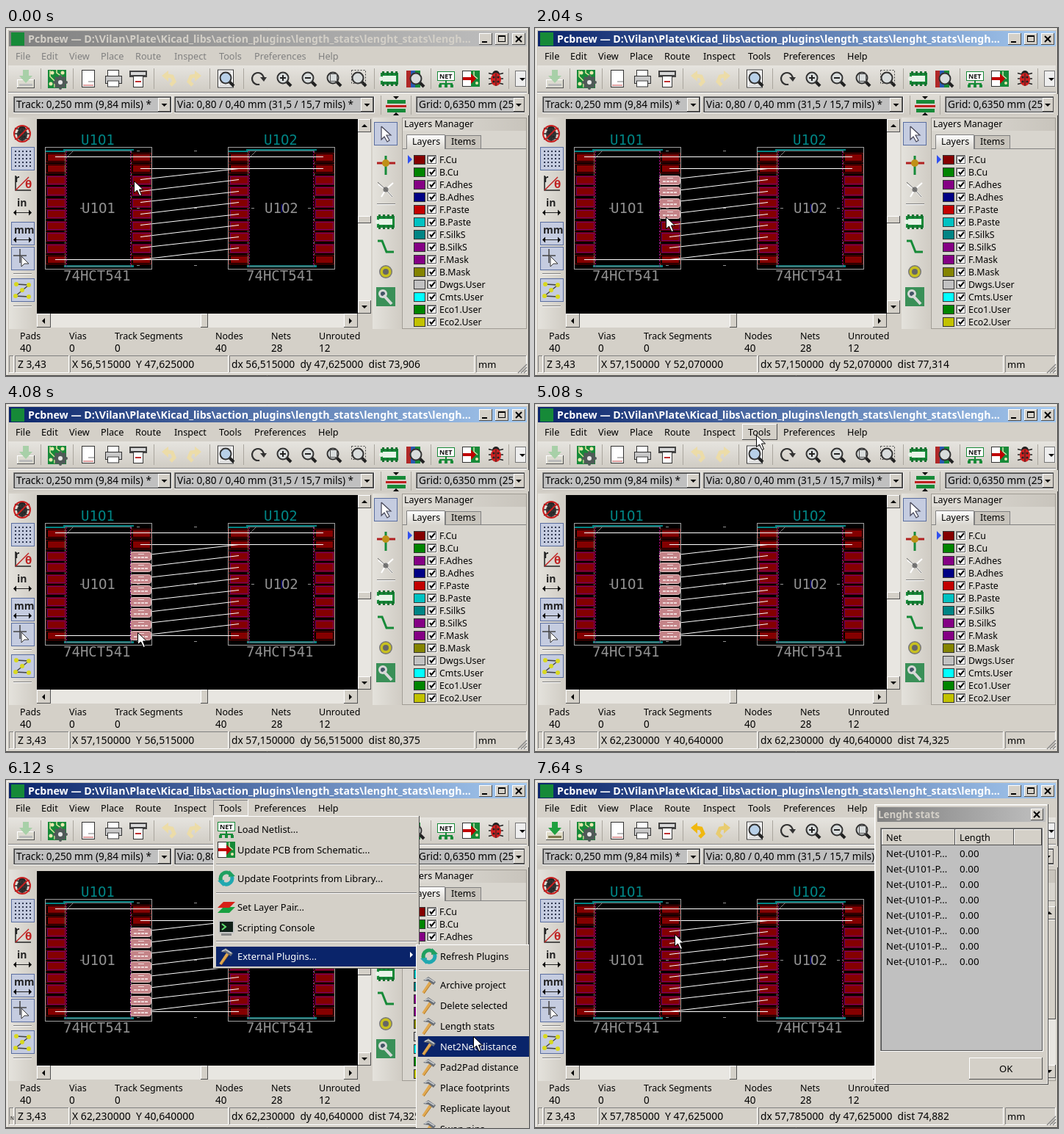
These frames come from a looping animation (712 px wide and 474 px high, 8 s). An HTML page with a canvas:

```html
<!DOCTYPE html>
<html lang="en">
<head>
<meta charset="utf-8">
<title>Board editor</title>
<style>
html, body { margin: 0; width: 100%; height: 100%; overflow: hidden; background: #d4d0c8 }
canvas { display: block }
</style>
</head>
<body>
<canvas id="stage" width="712" height="474"></canvas>
<script>
const g = document.getElementById('stage').getContext('2d');
const FACE = '#d4d0c8', NAVY = '#0a246a', GREY = '#808080', GREEN = '#168a38';

// start, pointer x, pointer y, board X, board Y, selected pads
const STEPS = [
  [0, 174, 208, 56.515, 47.625, 0],
  [480, 174, 208, 56.515, 47.625, 1],
  [1000, 174, 220, 56.515, 48.895, 2],
  [1520, 177, 247, 57.15, 50.8, 3],
  [2040, 178, 257, 57.15, 52.07, 4],
  [2560, 178, 269, 57.15, 52.705, 5],
  [3080, 179, 299, 57.15, 55.245, 6],
  [3560, 179, 311, 57.15, 56.515, 7],
  [4080, 179, 311, 57.15, 56.515, 8],
  [4600, 256, 112, 62.23, 40.64, 8],
  [5080, 301, 42, 62.23, 40.64, 8],
  [5600, 600, 237, 62.23, 40.64, 8],
  [6120, 636, 349, 62.23, 40.64, 8],
  [6640, 568, 48, 62.23, 40.64, 0],
  [7120, 400, 6, 62.23, 40.64, 0],
  [7640, 190, 210, 57.785, 47.625, 0]
];

// ---- drawing helpers ----
function rect(x, y, w, h, c) { g.fillStyle = c; g.fillRect(x, y, w, h); }
function box(x, y, w, h, c) { g.strokeStyle = c; g.lineWidth = 1; g.strokeRect(x + .5, y + .5, w - 1, h - 1); }
function path(pts) {
  g.beginPath();
  for (let i = 0; i < pts.length; i += 2) g.lineTo(pts[i], pts[i + 1]);
}
function line(c, w, ...pts) { path(pts); g.strokeStyle = c; g.lineWidth = w; g.stroke(); }
function poly(c, ...pts) { path(pts); g.fillStyle = c; g.fill(); }
function disc(x, y, r, c) { g.beginPath(); g.arc(x, y, r, 0, 7); g.fillStyle = c; g.fill(); }
function arc(x, y, r, a, b, c, w) {
  g.beginPath(); g.arc(x, y, r, a, b); g.strokeStyle = c; g.lineWidth = w; g.stroke();
}
function text(s, x, y, size = 12.7, c = '#000', weight = 400, font = '"Noto Sans", sans-serif') {
  g.font = `${weight} ${size}px ${font}`; g.fillStyle = c; g.fillText(s, x, y);
}
function stroked(s, x, y, c) {
  text(s.replace(/0/g, 'O'), x, y, 19, c, 400, '"DejaVu Sans Mono", monospace');
}
function fade(x, y, w, h, a, b, down) {
  const f = g.createLinearGradient(x, y, down ? x : x + w, down ? y + h : y);
  f.addColorStop(0, a); f.addColorStop(1, b);
  rect(x, y, w, h, f);
}
function bevel(x, y, w, h, up = true, bg = FACE) {
  rect(x, y, w, h, up ? '#505050' : '#fff');
  rect(x, y, w - 1, h - 1, up ? '#fff' : GREY);
  rect(x + 1, y + 1, w - 2, h - 2, bg);
}
function hollow(x, y, w, h) {
  line(GREY, 1, x + .5, y + h, x + .5, y + .5, x + w, y + .5);
  line('#fff', 1, x + w - .5, y, x + w - .5, y + h - .5, x, y + h - .5);
}
function groove(x, y, w) { rect(x, y, w, 1, GREY); rect(x, y + 1, w, 1, '#fff'); }
function chosen(x, y, w, h) { rect(x, y, w, h, '#c5cce0'); box(x, y, w, h, '#5a6ea0'); }
function arrow(x, y, dir) {
  const d = { u: [-4, 2, 4, 2, 0, -2], d: [-4, -2, 4, -2, 0, 2], l: [2, -4, 2, 4, -2, 0], r: [-2, -4, -2, 4, 2, 0] }[dir];
  poly('#000', ...d.map((v, i) => v + (i % 2 ? y : x)));
}
function cross(x, y, r, c, w) {
  line(c, w, x - r, y - r, x + r, y + r); line(c, w, x - r, y + r, x + r, y - r);
}

// ---- icons, placed by centre ----
function chip(x, y) {
  rect(x - 12, y - 8, 24, 16, GREEN);
  rect(x - 9, y - 4, 18, 8, '#e8f4e8');
  for (let i = -10; i < 12; i += 6) { rect(x + i, y - 10, 3, 5, '#157030'); rect(x + i, y + 5, 3, 5, '#157030'); }
  disc(x - 11, y, 3, '#e8f4e8');
}
function page(x, y, w = 18, h = 22) { rect(x - w / 2, y - h / 2, w, h, '#fff'); box(x - w / 2, y - h / 2, w, h, '#333'); }
function lens(x, y, mark, c = '#d8dcdc') {
  line('#222', 4, x + 4, y + 4, x + 10, y + 10);
  disc(x - 1, y - 1, 7.5, c); arc(x - 1, y - 1, 7.5, 0, 7, '#333', 2);
  if (mark) line('#222', 2, x - 5, y - 1, x + 3, y - 1);
  if (mark == '+') line('#222', 2, x - 1, y - 5, x - 1, y + 3);
}
function bug(x, y, c) {
  for (const k of [-5, 0, 5]) line('#222', 1.5, x - 10, y + k * 1.5, x, y + k, x + 10, y + k * 1.5);
  disc(x, y - 6, 5, '#222');
  g.beginPath(); g.ellipse(x, y + 1, 7, 9, 0, 0, 7); g.fillStyle = c; g.fill();
  line('#222', 1, x, y - 7, x, y + 10);
  for (const k of [-3, 3]) { disc(x + k, y - 2, 1.5, '#222'); disc(x + k, y + 4, 1.5, '#222'); }
}
function net(x, y) {
  rect(x - 12, y - 10, 24, 13, '#fff'); box(x - 12, y - 10, 24, 13, GREEN);
  text('NET', x - 9, y, 9, '#111', 700);
  line(GREEN, 2, x, y + 3, x, y + 7); line(GREEN, 2, x - 8, y + 10, x - 8, y + 7, x + 8, y + 7, x + 8, y + 10);
  for (const k of [-8, 0, 8]) rect(x + k - 2, y + 8, 4, 4, GREEN);
}
function update(x, y) {
  page(x - 5, y, 14, 22); rect(x, y - 11, 12, 22, GREEN);
  line('#d8e8b0', 1.5, x + 4, y - 10, x + 4, y - 4, x + 9, y); disc(x + 8, y + 6, 2, '#e8e8b0');
  rect(x - 11, y - 2, 12, 4, '#c00000'); poly('#c00000', x, y - 7, x + 7, y, x, y + 7);
}
function reload(x, y) {
  arc(x, y, 8, 2.7, 5.6, '#20a060', 5); arc(x, y, 8, -.4, 2.4, '#20a8b0', 5);
  poly('#20a060', x + 4, y - 11, x + 12, y - 3, x + 3, y - 2);
  poly('#20a8b0', x - 4, y + 11, x - 12, y + 3, x - 3, y + 2);
}
function hammer(x, y) {
  line('#e0a850', 4, x - 8, y + 11, x + 2, y - 4); line('#b07828', 1, x - 7, y + 12, x + 4, y - 3);
  poly('#686e76', x - 8, y - 6, x - 1, y - 11, x + 9, y - 4, x + 6, y, x - 1, y - 5);
  line('#c8ccd0', 1.5, x - 6, y - 7, x - 1, y - 9, x + 7, y - 4);
}
function layers(x, y) {
  for (const [k, c] of [[4, '#18a040'], [-3, '#d82018']]) poly(c, x - 12, y + k + 4, x - 4, y + k - 4, x + 12, y + k - 4, x + 4, y + k + 4);
}
function terminal(x, y) {
  rect(x - 11, y - 10, 22, 18, '#c8c8c8'); rect(x - 9, y - 8, 18, 14, '#102018');
  line('#60e070', 2, x - 6, y - 5, x - 1, y - 1, x - 6, y + 3);
  rect(x - 7, y + 8, 14, 3, '#888');
}
function bend(x, y, flip, c) {
  line(c, 5, x + 2 * flip, y + 9, x + 7 * flip, y + 4, x + 4 * flip, y - 3, x - 2 * flip, y - 4);
  poly(c, x - 10 * flip, y - 4, x - flip, y - 11, x - flip, y + 4);
}
function pointer(x, y) {
  const p = [0, 0, 0, 16, 4, 12.5, 7.5, 20, 10, 19, 7, 11.5, 12, 11.5].map((v, i) => v + (i % 2 ? y : x) + .5);
  poly('#fff', ...p); line('#000', 1, ...p, p[0], p[1]);
}

// ---- window parts ----
function frame(active) {
  rect(0, 0, 712, 474, FACE);
  line('#fff', 1, 1.5, 472, 1.5, 1.5, 710, 1.5);
  line('#404040', 1, 711.5, 0, 711.5, 473.5, 0, 473.5);
  fade(4, 4, 705, 21, active ? NAVY : GREY, active ? '#a6caf0' : '#c0c0c0');
  rect(7, 6, 18, 18, GREEN);
  text('Pcbnew — D:\\Vilan\\Plate\\Kicad_libs\\action_plugins\\length_stats\\lenght_stats\\lengh...', 30, 20, 14.2, active ? '#fff' : FACE, 700);
  for (const x of [644, 666, 689]) bevel(x, 7, 18, 16);
  rect(648, 18, 7, 2, '#000');
  box(670, 10, 10, 9, '#000'); rect(670, 10, 10, 2, '#000');
  cross(698, 15, 4, '#000', 2);
}
function menuBar(active, i) {
  if (i > 9 && i < 13) bevel(282, 27, 48, 22, i == 10);
  [['File', 13], ['Edit', 48], ['View', 86], ['Place', 129], ['Route', 176], ['Inspect', 229],
   ['Tools', 290], ['Preferences', 338], ['Help', 425]].forEach(([s, x]) => text(s, x, 43, 12.7, active ? '#000' : GREY));
}
function combo(x, w, s) {
  rect(x, 93, w, 23, '#c0c0c0'); hollow(x, 93, w, 23); box(x + 1, 94, w - 2, 21, '#404040');
  text(s, x + 4, 109, 13.6);
  bevel(x + w - 19, 95, 17, 19); arrow(x + w - 10.5, 105, 'd');
}
function topBars(edited) {
  fade(3, 51, 706, 36, '#e6e4df', '#d0ccc4', true);
  fade(3, 89, 706, 31, '#e0ddd7', '#d0ccc4', true);
  groove(3, 87, 706);
  for (const x of [47, 91, 201, 277, 323, 501, 578, 684]) rect(x, 55, 1, 28, '#aaa69e');
  // save
  bevel(15, 70, 24, 12, true, edited ? '#e0dcc8' : '#dcdad0'); rect(18, 76, 18, 3, edited ? '#807850' : '#bbb');
  poly(edited ? '#20a040' : '#a8d0a8', 23, 57, 31, 57, 31, 65, 36, 65, 27, 75, 18, 65, 23, 65);
  // board setup
  rect(57, 57, 25, 25, GREEN);
  line('#e0e8a0', 1.5, 60, 58, 60, 66, 66, 72, 66, 81); line('#e0e8a0', 1.5, 69, 57, 69, 61, 76, 66);
  for (const [x, y] of [[61, 76], [77, 61], [63, 61]]) disc(x, y, 2.5, '#e8e8b0');
  disc(74, 74, 8, '#505a58'); disc(74, 74, 3, '#e8e8e8');
  for (let a = 0; a < 6.2; a += .785) disc(74 + 8 * Math.cos(a), 74 + 8 * Math.sin(a), 2, '#505a58');
  page(112, 69, 18, 24); line('#c04040', 1, 105, 78, 119, 78); line('#777', 1, 112, 73, 120, 73);
  // print and plot
  page(146, 62, 16, 10); bevel(135, 65, 23, 11, true, '#c8c8c8'); box(135, 65, 23, 11, '#333'); page(146, 76, 16, 9);
  rect(168, 58, 24, 9, '#444'); rect(170, 60, 20, 4, '#d8d8d8'); page(180, 73, 14, 16); line('#c03030', 2, 176, 73, 184, 73);
  bend(222, 69, 1, edited ? '#f0b810' : '#ecdca8'); bend(256, 69, -1, edited ? '#e8cc70' : '#ecdca8');
  page(299, 69, 22, 25);
  for (let y = 60; y < 81; y += 3) line('#b0b0b0', 1, 291, y, 307, y);
  lens(300, 69, '', '#b8d0e8');
  arc(343, 69, 8, 1.3, 6.1, '#333', 2.2); poly('#333', 346, 67, 355, 67, 351, 73);
  lens(378, 69, '+'); lens(412, 69, '-'); lens(446, 69); lens(480, 69);
  box(441, 62, 10, 11, '#555');
  g.setLineDash([2, 2]); box(470, 57, 20, 19, '#444'); g.setLineDash([]);
  chip(522, 69);
  rect(545, 58, 6, 23, '#b02828'); rect(551, 58, 6, 23, '#2858b0'); rect(557, 58, 7, 23, GREEN); lens(559, 70);
  net(599, 69); update(633, 69); bug(667, 69, '#d02020');
  rect(693, 58, 16, 22, '#eee'); box(693, 58, 15, 22, '#777'); arrow(703, 70, 'd');
  combo(10, 216, 'Track: 0,250 mm (9,84 mils) *');
  combo(229, 273, 'Via: 0,80 / 0,40 mm (31,5 / 15,7 mils) *');
  for (const y of [98, 110]) rect(519, y, 25, 5, GREEN);
  rect(517, 105, 28, 3, '#c02020'); arrow(531, 95, 'd'); arrow(531, 117, 'u');
  rect(510, 92, 1, 26, '#aaa69e'); rect(551, 92, 1, 26, '#aaa69e');
  combo(558, 168, ''); rect(690, 95, 19, 19, '#c0c0c0');
  text('Grid: 0,6350 mm (25', 562, 109, 13.6);
  rect(706, 90, 6, 29, FACE); bevel(691, 95, 15, 19); arrow(698, 105, 'd');
}
function leftBar() {
  fade(4, 122, 37, 288, '#e4e2dc', '#d0ccc4');
  for (const y of [162, 264, 298, 341]) chosen(7, y, 32, 32);
  bug(22, 144, '#333'); arc(22, 144, 11, 0, 7, '#c82020', 2); line('#c82020', 2, 14, 152, 30, 136);
  for (let i = 0; i < 25; i++) rect(12 + i % 5 * 5, 167 + (i / 5 | 0) * 5, 2, 2, '#303850');
  line('#222', 1.5, 13, 201, 13, 221, 34, 221); line('#c02020', 1.5, 13, 221, 31, 203);
  text('r', 12, 210, 14, '#222', 700); text('θ', 26, 218, 15, '#c02020', 700);
  for (const [s, x, y] of [['in', 15, 243], ['mm', 11, 280]]) {
    text(s, x, y, 14, '#222', 600);
    line('#222', 1, 12, y + 8.5, 33, y + 8.5);
    arrow(12, y + 8.5, 'l'); arrow(33, y + 8.5, 'r');
  }
  line('#444', 1.5, 10, 310, 28, 310); line('#444', 1.5, 19, 301, 19, 320);
  poly('#fff', 21, 311, 21, 325, 25, 321, 31, 321); line('#333', 1, 21, 311, 21, 325, 25, 321, 31, 321, 21, 311);
  line('#444', 1.5, 14, 349, 31, 350, 13, 365, 31, 366);
  for (const [x, y] of [[14, 349], [31, 350], [13, 365], [31, 366], [22, 357]]) disc(x, y, 3, '#d8d820');
  groove(10, 334, 25); groove(10, 378, 25);
}
function rightBar() {
  fade(499, 122, 39, 288, '#e4e2dc', '#d0ccc4');
  chosen(501, 128, 32, 32);
  const p = [511, 134, 511, 152, 515, 148, 519, 155, 522, 153, 518, 146, 524, 146, 511, 134];
  poly('#fff', ...p); line('#445', 1.2, ...p);
  line('#b02020', 3, 505, 184, 530, 184); line(GREEN, 3, 517, 174, 517, 200); disc(517, 184, 5, '#c09018');
  for (const [x, y] of [[507, 213], [527, 211], [511, 230], [526, 230]]) line('#fff', 2, 517, 220, x, y);
  disc(517, 220, 3.5, '#777'); line('#666', 1, 506, 210, 517, 220, 526, 230);
  groove(505, 239, 25);
  chip(517, 264);
  line(GREEN, 3, 506, 290, 512, 290, 518, 305, 528, 305);
  disc(517, 332, 9, '#777'); disc(517, 332, 7.5, '#c8c020'); disc(517, 332, 4, '#666');
  rect(504, 353, 26, 26, '#3a9058'); disc(513, 362, 6, '#d8d8d8'); disc(513, 362, 3, '#456'); line('#d8d8d8', 4, 514, 364, 525, 376);
}
function part(x, name, picked) {
  line('#008484', 2, x + 1, 168, x + 26, 168, x + 26, 166, x + 121, 166);
  line('#008484', 3, x + 26, 324.5, x + 121, 324.5);
  box(x + 27, 167, 91, 158, '#707070');
  line('#808080', 1, x + 28, 178, x + 39, 167);
  for (let i = 0; i < 10; i++) for (const side of [1, 117]) {
    const px = x + side, y = Math.round(169.5 + 15.55 * i);
    if (side > 1 && i > 1 && i < picked + 2) {
      g.beginPath(); g.roundRect(px - .5, y + .5, 28, 12, 3);
      g.fillStyle = '#c48488'; g.fill(); g.strokeStyle = '#e8c8c8'; g.lineWidth = 1; g.stroke();
      rect(px + 10, y + 3, 8, 1, '#f0dcdc');
      for (let k = 4; k < 24; k += 5) rect(px + k, y + 7, 4, 2, '#eed8d8');
      continue;
    }
    box(px, y, 28, 13, '#6a0000');
    rect(px + 3, y + 2, 23, 9, '#840000');
    if (i > 1 && i < 9) box(px + 2, y + 1, 25, 11, '#78006c');
  }
  g.setLineDash([2, 2]); line('#840084', 1, x + 29.5, 168, x + 29.5, 325); line('#840084', 1, x + 116.5, 168, x + 116.5, 325); g.setLineDash([]);
  box(x, 162, 146, 167, '#a0a0a0');
  stroked(name, x + 49, 159, '#008484');
  stroked(name, x + 50, 252, '#909090');
  stroked('74HCT541', x + 25, 344, '#909090');
}
function board(picked) {
  rect(42, 124, 437, 265, '#000');
  for (let i = 0; i < 15; i++) rect(101 + i % 5 * 77.7 | 0, 167 + (i / 5 | 0) * 78, 4, 1, '#909090');
  part(302, 'U102', 0);
  line('#0000a0', 1, 375.5, 240, 375.5, 251);
  const row = i => Math.round(175 + 15.55 * i) + .5;
  line('#fff', 1, 67, row(0), 432, row(0));
  line('#fff', 1, 183, row(1), 432, row(1));
  for (let i = 2; i < 10; i++) line('#fff', 1, 183, row(i), 317, row(i - 1));
  line('#fff', 1, 67, row(9), 317, row(9));
  part(53, 'U101', picked);
  // wires stay above unpicked pads
  line('#fff', 1, 67, row(0), 198, row(0));
  line('#fff', 1, 183, row(1), 198, row(1));
  for (let i = picked + 2; i < 10; i++) line('#fff', 1, 183, row(i), 198, row(i) - 15.55 * 15 / 134);
  line('#fff', 1, 67, row(9), picked > 7 ? 169 : 198, row(9));
  rect(479, 124, 18, 265, '#e8e6e1'); rect(42, 389, 437, 19, '#e8e6e1'); rect(479, 389, 18, 19, FACE);
  bevel(479, 124, 18, 18); arrow(488, 133, 'u');
  bevel(479, 371, 18, 18); arrow(488, 380, 'd');
  bevel(479, 256, 18, 10);
  bevel(42, 389, 19, 19); arrow(51, 399, 'l');
  bevel(460, 389, 19, 19); arrow(469, 399, 'r');
  bevel(265, 389, 10, 19);
}
function layerPanel() {
  rect(539, 122, 170, 288, '#d8d5ce'); box(539, 122, 170, 288, '#a09c94');
  fade(540, 123, 168, 17, '#e0ddd7', '#c8c4bc');
  text('Layers Manager', 542, 135, 12.5);
  rect(540, 164, 168, 1, GREY);
  rect(598, 146, 48, 18, '#c8c4bc'); box(598, 146, 49, 19, GREY);
  fade(545, 145, 53, 20, '#fff', '#d8d5ce', true); line(GREY, 1, 545.5, 165, 545.5, 145.5, 597.5, 145.5, 597.5, 165);
  text('Layers', 553, 159, 12.5); text('Items', 606, 159, 12.5);
  poly('#3050f0', 547, 173, 553, 179, 547, 185);
  'F.Cu 840000,B.Cu 008400,F.Adhes 840084,B.Adhes 000084,F.Paste c20000,B.Paste 00c2c2,F.SilkS 008484,B.SilkS 840084,F.Mask 840084,B.Mask 848400,Dwgs.User c2c2c2,Cmts.User 00ffff,Eco1.User 008400,Eco2.User c2c200'
    .split(',').forEach((s, i) => {
      const [name, c] = s.split(' '), y = Math.round(173 + 17 * i);
      rect(555, y, 16, 13, '#' + c); box(555, y, 16, 13, '#333');
      bevel(573, y, 14, 13, false, '#fff'); box(574, y + 1, 12, 11, '#555');
      line('#000', 2, 577, y + 6, 579, y + 9, 584, y + 3);
      text(name, 590, y + 11, 12.4);
    });
}
function infoRow(padInfo) {
  rect(3, 410, 706, 34, FACE);
  const cells = padInfo
    ? [['Footprint', 'U101', 19], ['Pad', '18', 104], ['Net', 'Net-(U101-Pad18)', 152], ['Layer', 'F.Cu', 285], ['Width', '1,950 mm', 345], ['Height', '0,600 mm', 430], ['Angle', '0,0', 518], ['Position', '(56,51, 47,62)', 592]]
    : [['Pads', 40, 19], ['Vias', 0, 86], ['Track Segments', 0, 148], ['Nodes', 40, 285], ['Nets', 28, 361], ['Unrouted', 12, 426]];
  for (const [a, b, x] of cells) { text(a, x, 424, 12.5); text(b, x, 441, 13.5); }
}
function statusBar(X, Y, hint) {
  const num = (v, n = 6) => v.toFixed(n).replace('.', ',');
  for (const [a, b] of [[4, 11], [12, 86], [87, 303], [304, 638], [640, 709]]) hollow(a, 446, b - a, 24);
  if (hint) text('N', 6, 463, 6.5);
  text('Z 3,43', 16, 463, 13.8);
  text(`X ${num(X)}  Y ${num(Y)}`, 90, 463, 14);
  text(`dx ${num(X)}  dy ${num(Y)}  dist ${num(Math.hypot(X, Y), 3)}`, 307, 463, 13.8);
  text('mm', 643, 463, 13);
  for (let k = 4; k < 16; k += 4) line('#888', 1.5, 709 - k, 470, 709, 470 - k);
}
function popups(choice) {
  bevel(282, 49, 281, 208);
  rect(286, 227, 274, 27, NAVY);
  [[net, 'Load Netlist...', 67], [update, 'Update PCB from Schematic...', 95], [reload, 'Update Footprints from Library...', 134],
   [layers, 'Set Layer Pair...', 173], [terminal, 'Scripting Console', 201], [hammer, 'External Plugins...', 240]].forEach(([icon, s, y]) => {
    icon(300, y); text(s, 315, y + 5, 12.9, y == 240 ? '#fff' : '#000');
  });
  for (const y of [114, 153, 219]) groove(286, y, 273);
  poly('#fff', 550, 234, 554, 238, 550, 242);
  bevel(558, 224, 160, 260);
  ['Refresh Plugins', 'Archive project', 'Delete selected', 'Length stats', 'Net2Net distance', 'Pad2Pad distance', 'Place footprints', 'Replicate layout', 'Swap pins'].forEach((s, i) => {
    const y = i ? 251 + 28 * i : 240;
    if (i == choice) rect(561, y - 14, 151, 28, NAVY);
    (i ? hammer : reload)(576, y);
    text(s, 591, y + 5, 12.8, i == choice ? '#fff' : '#000');
  });
  groove(562, 258, 150);
}
function dialog(active) {
  rect(693, 172, 16, 234, '#e8e6e1');
  bevel(691, 172, 18, 18); arrow(700, 181, 'u');
  bevel(691, 190, 18, 136); bevel(691, 388, 18, 18); arrow(700, 397, 'd');
  bevel(462, 33, 237, 382); box(463, 34, 235, 380, '#eeece8');
  fade(466, 37, 229, 20, active ? NAVY : GREY, active ? '#a6caf0' : '#c0c0c0');
  text('Lenght stats', 467, 52, 13.4, active ? '#fff' : FACE, 700);
  bevel(675, 39, 17, 16); cross(683, 47, 4, '#000', 2);
  bevel(470, 65, 222, 305, false, '#c0c0c0'); box(471, 66, 220, 303, '#505050');
  for (const [x, w] of [[472, 100], [572, 80], [652, 38]]) bevel(x, 67, w, 22);
  text('Net', 478, 83); text('Length', 578, 83);
  for (let i = 0; i < 8; i++) { text('Net-(U101-P...', 478, 105 + 21 * i, 13.1); text('0.00', 578, 105 + 21 * i, 13.4); }
  bevel(591, 378, 100, 30); text('OK', 632, 398, 13);
}

function draw(now) {
  const t = now % 8000;
  const i = STEPS.findLastIndex(s => s[0] <= t);
  const [, px, py, X, Y, picked] = STEPS[i];
  const active = i != 0 && i != 13;
  frame(active);
  menuBar(active, i);
  topBars(i > 12);
  leftBar();
  rightBar();
  board(picked);
  layerPanel();
  infoRow(i == 1);
  statusBar(X, Y, i == 12);
  if (i == 11 || i == 12) popups(i == 11 ? 0 : 4);
  if (i > 12) dialog(i == 13);
  pointer(px, py);
}
const start = performance.now();
function tick() {
  draw(performance.now() - start);
  requestAnimationFrame(tick);
}
tick();
</script>
</body>
</html>
```
